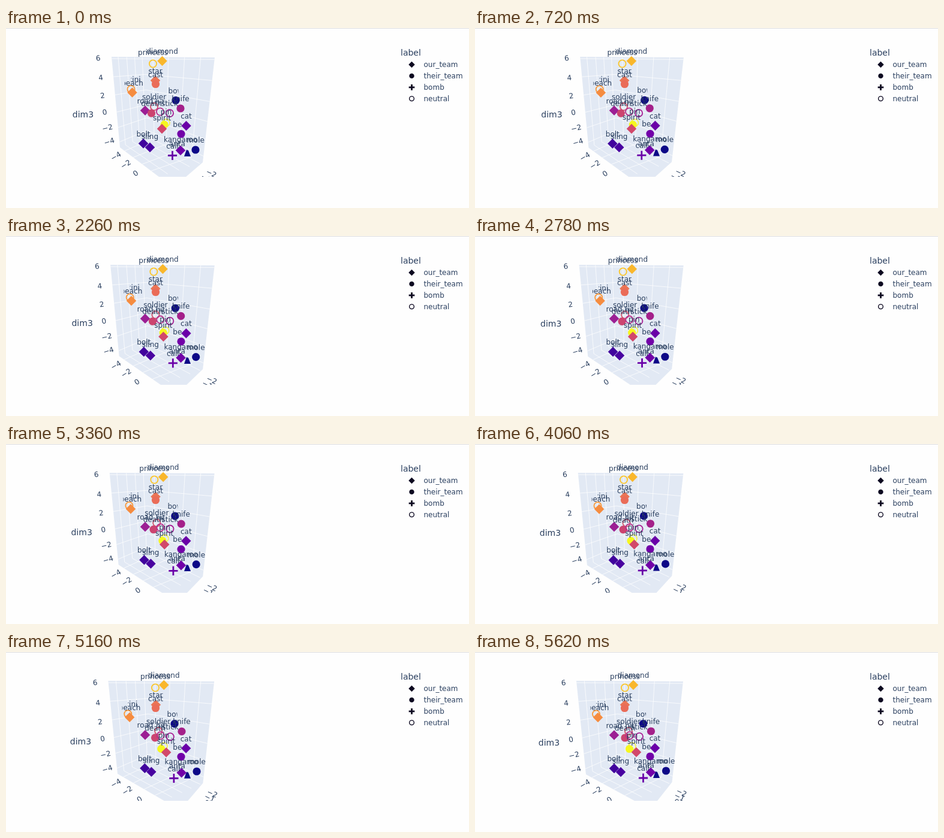
Recreate the animation shown at these times as an HTML page with a canvas. Size 772 by 300 pixels, loop 5640 ms.

```html
<!DOCTYPE html>
<html lang="en">
<head>
<meta charset="utf-8">
<title>Word scatter</title>
<style>
html, body { margin: 0; width: 100%; height: 100%; overflow: hidden; background: #fefefe; }
canvas { display: block; }
</style>
</head>
<body>
<canvas id="stage" width="772" height="300"></canvas>
<script>
const ctx = document.getElementById('stage').getContext('2d');
const LOOP = 5640, INK = '#2a3f5f', FONT = '"DejaVu Sans", sans-serif';

// Camera turn: [step, progress]
const turn = [[0, 0], [16, .11], [36, .17], [59, .35], [87, .61], [110, .8], [121, 1], [122, 1]];

// shape, colour, start x, y, end x, y, word, visible span around the centre
const points = [
  ['ring', '#fbc62a', 245, 59.5, 250, 59.5, 'princess'],
  ['diamond', '#f9b72c', 260.5, 55, 264, 55, 'diamond'],
  ['diamond', '#ea7455', 249, 87.5, 250, 88, 'star'],
  ['dot', '#ea6c58', 249.5, 93.5, 249.5, 93.5, 'cast'],
  ['ring', '#fa9b3d', 208.5, 102, 202, 103.5, 'bikini', 0, 40],
  ['diamond', '#f58c40', 210.5, 107.5, 205, 109, 'beach', -12.5, 40],
  ['dot', '#0d0887', 283, 120.5, 280.5, 119.5, 'bow', -40, 4.5],
  ['dot', '#a4208a', 291, 134, 293.5, 132, 'knife'],
  ['diamond', '#9c1f94', 232, 137.5, 232, 138.5, 'road'],
  ['ring', '#d6556d', 247, 131, 256, 132, 'soldier'],
  ['dot', '#cc4470', 242.5, 142, 250, 143, 'death'],
  ['ring', '#b6308b', 257, 139.5, 258, 139, 'hit'],
  ['ring', '#a82296', 273, 142, 274, 141, 'stick'],
  ['ring', '#f2f25a', 267, 158, 262, 157, 'pin'],
  ['dot', '#f6f71f', 264, 161, 257.5, 161.5],
  ['diamond', '#d2486a', 260, 168, 269, 167, 'spirit'],
  ['diamond', '#6a00a8', 300.5, 163, 300, 160, 'cat'],
  ['dot', '#7201a8', 292, 176.5, 292, 174, 'bear', -40, 2],
  ['diamond', '#41049d', 229, 192.5, 232, 194, 'bolt'],
  ['diamond', '#4903a0', 240, 199, 243, 200, 'sling'],
  ['wedge', '#0d0887', 302, 209, 302, 205, 'antarctica', -40, -3],
  ['plus', '#6a00a8', 277.5, 212.5, 280.5, 210, 'call'],
  ['diamond', '#7201a8', 291, 204, 293, 200.5, 'kangaroo'],
  ['dot', '#0d0887', 316, 203, 318.5, 198, 'mole']
];

// text, start x, y, end x, y, tilt in degrees
const ticks = [
  ['6', 153.5, 50, 147.5, 51, -6], ['4', 158, 82.5, 152, 85, -7],
  ['2', 161, 112.5, 156, 117, -8], ['0', 164.5, 140, 160, 145.5, -10],
  ['−2', 169, 166, 165, 171.5, -13], ['−4', 172, 189, 168, 196, -17],
  ['−4', 183, 213.5, 183, 219.5, -30], ['−2', 199.5, 227, 202.5, 231.5, -32],
  ['0', 216, 242, 224, 246, -34],
  ['−2', 342.5, 242, 344.5, 234, 24], ['−1', 334, 250, 341, 241.5, 26], ['0', 328, 258, 336, 249.5, 28]
];

const mix = (a, b, p) => a + (b - a) * p;
const between = (a, b, p) => [mix(a[0], b[0], p), mix(a[1], b[1], p)];

// The picture advances three steps per 140 ms: held for 20, 100 and 20 ms.
function stepAt(t) {
  const rest = t % 140;
  return Math.floor(t / 140) * 3 + (rest >= 20) + (rest >= 120);
}

function progress(step) {
  const i = turn.findIndex(k => k[0] > step), [s0, p0] = turn[i - 1], [s1, p1] = turn[i];
  return mix(p0, p1, (step - s0) / (s1 - s0));
}

function trace(...pts) {
  ctx.beginPath();
  pts.forEach(q => ctx.lineTo(...q));
}

function text(str, x, y, size = 12, align = 'center') {
  ctx.font = size + 'px ' + FONT;
  ctx.textAlign = align;
  ctx.fillStyle = INK;
  ctx.fillText(str, x, y);
}

function marker(shape, color, x, y, r, weight) {
  ctx.fillStyle = ctx.strokeStyle = color;
  ctx.lineWidth = weight;
  if (shape === 'diamond') {
    const d = r * 1.25;
    trace([x, y - d], [x + d, y], [x, y + d], [x - d, y]);
    ctx.fill();
  } else if (shape === 'wedge') {
    trace([x - 1, y - 6], [x + 2, y - 5], [x + 6, y + 5], [x - 5, y + 5]);
    ctx.fill();
  } else if (shape === 'plus') {
    const d = r * 1.15;
    ctx.lineWidth = weight * 1.5;
    ctx.beginPath();
    ctx.moveTo(x - d, y); ctx.lineTo(x + d, y);
    ctx.moveTo(x, y - d); ctx.lineTo(x, y + d);
    ctx.stroke();
  } else {
    ctx.beginPath();
    ctx.arc(x, y, shape === 'ring' ? r * .92 : r, 0, 7);
    shape === 'ring' ? ctx.stroke() : ctx.fill();
  }
}

function room(p) {
  const at = (x0, y0, x1, y1) => [mix(x0, x1, p), mix(y0, y1, p)];
  const tl = at(176, 48, 169, 48), tr = at(348, 49, 347, 49);
  const bl = at(190, 199, 185, 204), br = at(328, 224, 328.5, 217);
  const ct = at(231, 49, 236, 49), cb = at(236, 178, 240, 178);
  const f1 = at(255, 248, 266, 248), f2 = at(300, 248, 304, 248);
  ctx.fillStyle = '#e2e9f4';
  trace(tl, tr, br, f2, f1, bl);
  ctx.fill();
  ctx.strokeStyle = 'rgba(255,255,255,.75)';
  ctx.lineWidth = 1;
  const line = (...q) => { trace(...q); ctx.stroke(); };
  for (const k of [.2, .46, .7, .93]) line(between(tl, ct, k), between(bl, cb, k), between(f1, br, k));
  for (const k of [.12, .34, .57, .8]) line(between(ct, tr, k), between(cb, br, k), between(bl, f1, k));
  for (const k of [.02, .22, .42, .61, .78, .94]) line(between(tl, bl, k), between(ct, cb, k), between(tr, br, k));
}

function word(str, x, y, from = -60, to = 60) {
  ctx.save();
  ctx.beginPath();
  ctx.rect(x + from, y - 40, to - from, 60);
  ctx.clip();
  text(str, x, y - (/[gp]/.test(str) ? 14.5 : 12));
  ctx.restore();
}

function legend() {
  text('label', 658, 46, 14, 'left');
  [['diamond', 'our_team'], ['dot', 'their_team'], ['plus', 'bomb'], ['ring', 'neutral']].forEach(([shape, name], i) => {
    const y = 61 + i * 18.9;
    marker(shape, '#0c0820', 676.5, y, 4.2, shape === 'ring' ? 1.4 : 1.9);
    text(name, 696.5, y + 4, 12, 'left');
  });
}

function draw(now) {
  const p = progress(stepAt(now % LOOP));
  ctx.fillStyle = '#fefefe';
  ctx.fillRect(0, 0, 772, 300);
  ctx.fillStyle = '#dddde0';
  ctx.fillRect(0, 0, 772, 1);

  ctx.save();
  ctx.beginPath();
  ctx.rect(0, 0, 640, 248);
  ctx.clip();
  room(p);
  for (const [str, x0, y0, x1, y1, tilt] of ticks) {
    ctx.save();
    ctx.translate(mix(x0, x1, p), mix(y0, y1, p));
    ctx.rotate(tilt * Math.PI / 180);
    text(str, 0, 4.3);
    ctx.restore();
  }
  text('dim3', mix(128.5, 123.5, p), mix(148.5, 155.5, p), 14);
  const placed = points.map(([shape, color, x0, y0, x1, y1, ...label]) =>
    ({ shape, color, x: mix(x0, x1, p), y: mix(y0, y1, p), label }));
  for (const m of placed) marker(m.shape, m.color, m.x, m.y, 6.6, 1.85);
  for (const { x, y, label: [str, from, to] } of placed) if (str) word(str, x, y, from, to);
  ctx.restore();

  legend();
  requestAnimationFrame(() => draw(performance.now()));
}
draw(performance.now());
</script>
</body>
</html>
```
